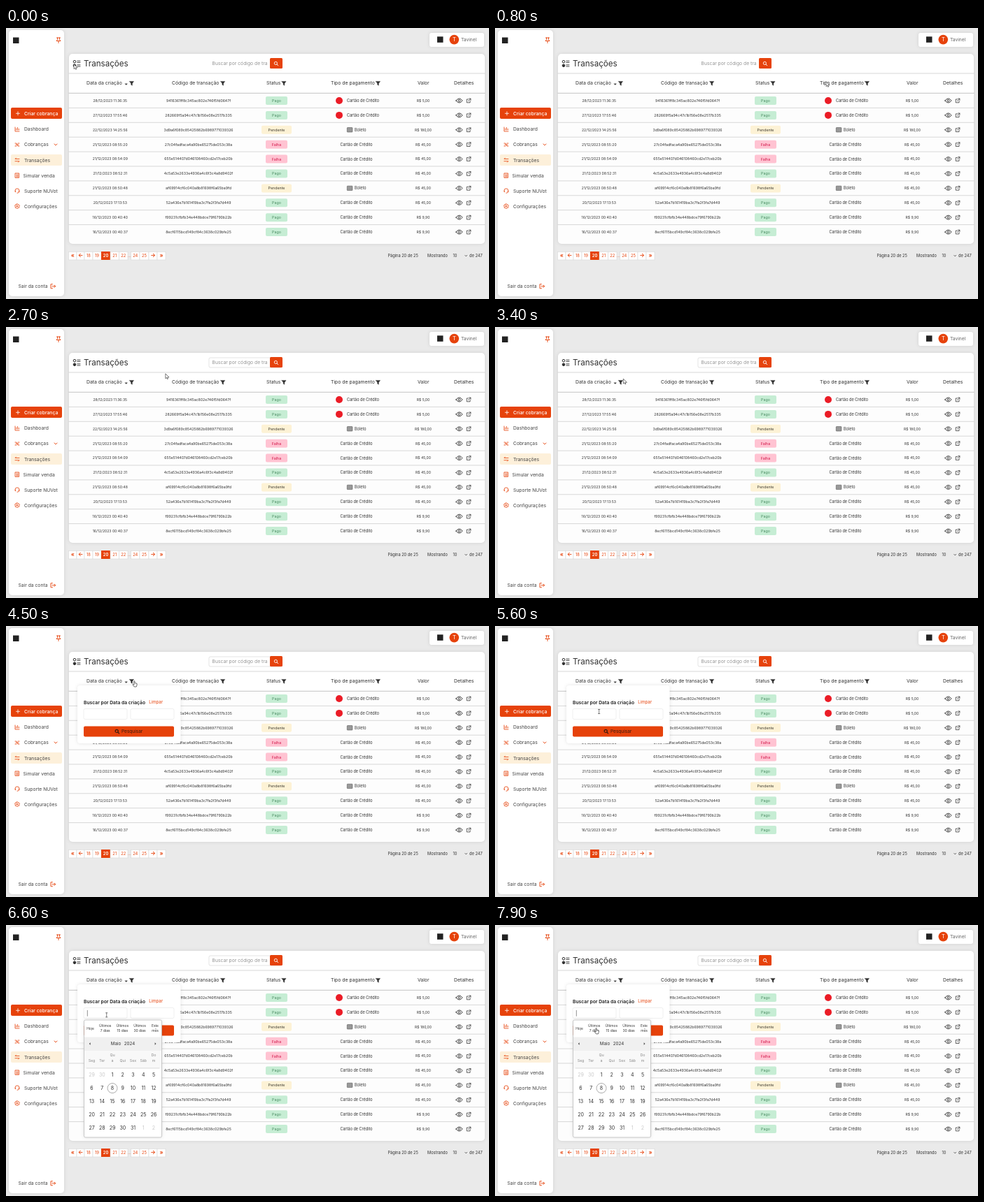
Write an HTML page that moves like this. It is 690 px wide and 388 px high and loops after 8 s.

```html
<!DOCTYPE html>
<html lang="pt-BR">
<head>
<meta charset="utf-8">
<title>Transações</title>
<style>
  html, body { margin: 0; width: 100%; height: 100%; overflow: hidden; background: #eaeaea; }
  svg { display: block; width: 100%; height: 100%; font-family: Inter, "Open Sans", sans-serif; }
  .card { filter: drop-shadow(0 0 2.5px #0000001c); }
</style>
</head>
<body>
<svg id="stage" viewBox="0 0 690 388"></svg>
<script>
const ORANGE = '#e6420b', INK = '#303030';

const rect = (x, y, w, h, fill, r = 0, extra = '') =>
  `<rect x="${x}" y="${y}" width="${w}" height="${h}" rx="${r}" fill="${fill}" ${extra}/>`;
const disc = (x, y, r, fill, extra = '') => `<circle cx="${x}" cy="${y}" r="${r}" fill="${fill}" ${extra}/>`;
const path = (d, stroke, width = 0.8, fill = 'none') =>
  `<path d="${d}" stroke="${stroke}" stroke-width="${width}" fill="${fill}" stroke-linecap="round" stroke-linejoin="round"/>`;
const at = (x, y, content) => `<g transform="translate(${x} ${y})">${content}</g>`;
// y is the vertical middle of the line
const text = (x, y, str, size, fill = INK, anchor = 'start', extra = '') =>
  `<text x="${x}" y="${y + size * 0.36}" font-size="${size}" fill="${fill}" text-anchor="${anchor}" ${extra}>${str}</text>`;
const mid = (x, y, str, size, fill, extra) => text(x, y, str, size, fill, 'middle', extra);
const hline = (x1, x2, y, color, width = 0.6) => path(`M${x1} ${y}H${x2}`, color, width);

const funnel = (x, y) => at(x, y, path('M-3-2.8H3L.8 .2V3L-.8 2V.2Z', INK, 0.5, INK));
const lens = (x, y, color, w = 0.9) => at(x, y, disc(-.6, -.6, 2.1, 'none', `stroke="${color}" stroke-width="${w}"`) + path('M1 1L2.8 2.8', color, w));
const eye = (x, y) => at(x, y, path('M-4.6 0Q0-6.2 4.6 0Q0 6.2-4.6 0Z', INK, 0.9) + disc(0, 0, 1.5, 'none', `stroke="${INK}" stroke-width=".9"`));
const openLink = (x, y) => at(x, y, path('M-.5-2H-2.8V2.8H2V.5M.6-2.9H2.9V-.6M2.8-2.8L-.5 .5', INK, 0.75));

function sidebar() {
  const icons = [
    'M-3-3V3H3M-1.2 1V-1M.6 1V-2.5M2.4 1V-.5',
    'M-3-2H-1L1 2H3M-3 2H-1M1-2H3M-2 0H2',
    'M3-1.6H-3L-1.6-3M-3 1.6H3L1.6 3',
    'M-2.6-3.2H2.6V3.2H-2.6ZM-1.2-1.4H1.2M-1.2 .4H1.2M-1.2 1.8H1.2',
    'M-3 1V-.3A3 3 0 0 1 3-.3V1.4L1 3H0M-2.4 0V1.6M2.4 0V1.6',
    'M-1-3.2H1L1.4-2.2L2.8-2L3.4-.4L2.6 .6L2.8 2L1.2 2.4L0 3.4L-1.2 2.4L-2.8 2L-2.6 .6L-3.4-.4L-2.8-2L-1.4-2.2ZM-1 0A1 1 0 1 0 1 0A1 1 0 1 0-1 0'
  ];
  const labels = ['Dashboard', 'Cobranças', 'Transações', 'Simular venda', 'Suporte NUVot', 'Configurações'];
  const items = labels.map((label, i) => {
    const y = 145 + 22.05 * i;
    return at(16, y, path(icons[i], ORANGE, 0.8)) + text(i === 3 ? 24.5 : 26, y, label, 6.75, '#444');
  }).join('');
  return rect(4, 3, 79, 381, '#fff', 5, 'class="card"')
    + rect(10, 13.5, 8.5, 8.5, '#222')
    + at(75, 17.5, path('M-2.5-3.5H2.5M-1.5-3.5V-.8L-3 1H3L1.5-.8V-3.5M0 1V4', ORANGE, 0.9))
    + rect(7, 114, 73, 16, ORANGE, 2) + path('M14.5 122.3H19.5M17 119.8V124.8', '#fff', 0.8)
    + text(26, 122.3, 'Criar cobrança', 6.8, '#fff', 'start', 'font-weight="500"')
    + rect(7, 181, 73, 16, '#fdf0da', 2) + items
    + path('M69 166L71 168L73 166', ORANGE, 0.9)
    + text(17.5, 369.8, 'Sair da conta', 6.75, '#444')
    + at(67, 369.8, path('M-.5-3H-3V3H-.5M-1 0H3.6L2-1.7M3.6 0L2 1.7', ORANGE, 0.9));
}

function topBar() {
  return rect(605, 7, 78, 20, '#fff', 3, 'class="card"') + rect(616, 12.3, 8.5, 8.5, '#222')
    + disc(640.3, 16.6, 6.8, ORANGE) + mid(640.3, 16.6, 'T', 7.5, '#fff')
    + text(650, 16.8, 'Tavinel', 6.7, '#666');
}

const rows = [
  ['28/12/2023 11:36:35', '9416361ff8c345ac802e746f5fd0647f', 'Pago', 'card', '5,00'],
  ['27/12/2023 17:55:46', '282669f5a94c47c1b156e08e2517b335', 'Pago', 'card', '5,00'],
  ['22/12/2023 14:25:56', '3d9a6f089c85425882b6989771039326', 'Pendente', 'Boleto', '180,00'],
  ['21/12/2023 08:55:20', '27c04fadfaca4a90be65275de053c38a', 'Falha', '', '45,00'],
  ['21/12/2023 08:54:09', '655e514407d046108460cd2e17ceb20b', 'Falha', '', '45,00'],
  ['21/12/2023 08:52:31', '4c5a53e2633e4936a4c6f3c4a8d9402f', 'Pago', '', '45,00'],
  ['21/12/2023 08:50:48', 'af69914cf6c040a8b81698f6a65ba9fd', 'Pendente', 'Boleto', '45,00'],
  ['20/12/2023 17:13:53', '52a436e7b161419ba3c7fa2f3fa7d449', 'Pago', '', '45,00'],
  ['16/12/2023 00:40:40', 'f99231cfbfb34e448bdce79f6790b22b', 'Pago', '', '9,90'],
  ['16/12/2023 00:40:37', '8ecf6115bcd149cf84c3638c029bfe25', 'Pago', '', '9,90']
];
const badges = {
  Pago: [31, '#c6edd4', '#4b8d63'],
  Falha: [31, '#ffc3d2', '#d3174a'],
  Pendente: [43, '#fdf2d5', '#3c3a30']
};

function paymentType(kind, y) {
  if (kind === 'card') return disc(476, y, 5, '#eb1c26') + text(487, y, 'Cartão de Crédito', 5.5);
  if (kind === 'Boleto') return rect(487.3, y - 3.2, 7.6, 6.4, '#999', 0.6, 'stroke="#555" stroke-width=".6"') + text(498, y, kind, 5.5);
  return mid(500.5, y, 'Cartão de Crédito', 5.5);
}

function tablePanel() {
  const headers = [[115, 'Data da criação', 179.5], [237, 'Código de transação', 309.7], [372, 'Status', 397],
    [464, 'Tipo de pagamento', 531.5], [588, 'Valor'], [640, 'Detalhes']];
  const heads = headers.map(([x, label, icon]) =>
    text(x, 79, label, 6.85) + (icon ? funnel(icon, 79.2) : '')).join('');
  const body = rows.map(([date, code, status, kind, value], i) => {
    const y = 104 + 20.9 * i, [w, bg, fg] = badges[status];
    return mid(148.8, y, date, 5.1) + mid(275, y, code, 5.2)
      + rect(386.5 - w / 2, y - 6, w, 12, bg, 2) + mid(386.5, y, status, 5.3, fg)
      + paymentType(kind, y) + mid(596, y, 'R$ ' + value, 5.1)
      + eye(647.5, y) + openLink(661, y)
      + (i < 9 ? hline(90, 684, y + 10.4, '#bebebe') : '');
  }).join('');
  const listIcon = [48.2, 53.8].map((y, i) =>
    disc(98, y, 1.8, i ? INK : 'none', `stroke="${INK}" stroke-width="1"`)
    + path(`M101.8 ${y - 1}H106M101.8 ${y + 1.2}H106`, INK, 0.9)).join('');
  return rect(90, 37, 594, 272, '#fff', 5, 'class="card"') + rect(90, 94, 594, 214, '#fdfdfd', 5)
    + listIcon + text(111, 50.5, 'Transações', 11.6)
    + rect(290, 44, 104, 14, 'none', 2, 'id="searchBorder" stroke="#d8d8d8" stroke-width=".7"')
    + `<clipPath id="searchClip">${rect(290, 44, 83, 14, '#000')}</clipPath>`
    + text(294.5, 51, 'Buscar por código de transação', 6.75, '#949494', 'start', 'clip-path="url(#searchClip)"')
    + rect(377, 43, 18, 15, ORANGE, 1.5) + lens(386, 51, '#fff')
    + hline(90, 684, 65, '#bebebe') + heads + path('M170.2 79.8H173.4L171.8 81.4Z', INK, 0.4, INK)
    + hline(90, 684, 93.3, '#9a9a9a') + body;
}

function pagination() {
  const edges = [89.5, 101, 112, 124, 136, 149, 161.5, 174, 178.5, 191, 204, 216, 228];
  const labels = ['«', '←', '18', '19', '20', '21', '22', '…', '24', '25', '→', '»'];
  const cells = labels.map((label, i) => {
    const x = edges[i], w = edges[i + 1] - x, active = label === '20', symbol = /[«»←→]/.test(label);
    const box = label === '…' ? ''
      : active ? rect(x, 320, w, 12, ORANGE)
      : rect(x, 320.3, w, 11.7, '#fff', 0, 'stroke="#d8d8d8" stroke-width=".6"');
    return box + mid(x + w / 2, symbol ? 325.6 : 326.2, label, symbol ? 8 : 5.8, active ? '#fff' : ORANGE,
      active || symbol ? 'font-weight="600"' : '');
  }).join('');
  return cells + text(545.5, 326, 'Página 20 de 25', 5.65) + text(602, 326, 'Mostrando', 5.7)
    + text(638.5, 326, '10', 5.5) + path('M655.9 325.5L657.2 326.8L658.5 325.5', INK, 0.8) + text(662, 326, 'de 247', 5.7);
}

function filterPopup() {
  const field = x => rect(x, 118.5, 62, 15, '#fff', 2, 'stroke="#e8e8e8" stroke-width=".7"');
  return rect(102, 85, 147.5, 83, '#fff', 4, 'class="card"')
    + text(111, 109.3, 'Buscar por Data da criação', 6.75, '#1c1c1c', 'start', 'font-weight="600"')
    + text(204.3, 109.3, 'Limpar', 6.1, ORANGE) + field(111) + field(178)
    + rect(111, 143.5, 129, 15, ORANGE, 2) + lens(158.8, 151, '#3a1c10', 1.2)
    + text(165, 151, 'Pesquisar', 6.5, '#3a1c10');
}

function calendar() {
  const presets = [[120.5, 'Hoje'], [141.7, 'Últimos', '7 dias'], [166.3, 'Últimos', '15 dias'], [191, 'Últimos', '30 dias'], [213, 'Este', 'mês']];
  const column = i => 122.5 + 14.75 * i;
  const weekdays = ['Seg', 'Ter', 'Qu a', 'Qui', 'Sex', 'Sáb', 'Do m'].map((day, i) => {
    const [top, bottom] = day.split(' ');
    return bottom ? mid(column(i), 186.5, top, 5.3, '#888') + mid(column(i), 194, bottom, 5.3, '#888')
      : mid(column(i), 194, top, 5.3, '#888');
  }).join('');
  let days = '';
  for (let i = 0; i < 35; i++) {
    const n = i - 1, inMonth = n >= 1 && n <= 31;
    const label = n < 1 ? n + 30 : n > 31 ? n - 31 : n;
    days += mid(column(i % 7), 214.5 + 19.1 * Math.floor(i / 7), label, 7, inMonth ? INK : '#c8c8c8');
  }
  return rect(111.5, 136, 111, 168, '#fff', 2, 'class="card" stroke="#b4b4b4" stroke-width=".7"')
    + presets.map(([x, a, b]) => b ? mid(x, 144.3, a, 4.9) + mid(x, 151.3, b, 4.9) : mid(x, 148, a, 4.9)).join('')
    + rect(112, 160.5, 110, 19.5, '#f0f0f0') + rect(112, 180, 110, 25, '#f8f8f8')
    + path('M120.2 168.9L119 170L120.2 171.1ZM213 168.9L214.2 170L213 171.1Z', INK, 0.4, INK)
    + mid(157, 170, 'Maio', 6.2) + mid(176.5, 170, '2024', 6.2) + weekdays
    + hline(115, 219, 205, '#c4c4c4')
    + disc(column(2), 233.6, 7, 'none', 'stroke="#888" stroke-width=".7"') + days;
}

const pointers = {
  arrow: path('M0 0V6.6L1.6 5.2L2.6 7.4L3.6 7L2.7 4.8H4.7Z', '#222', 0.6, '#fff'),
  hand: path('M0 .4Q.6-.6 1.2 .4V3L4.2 3.7V6L3.4 8.4H.4L-1.9 5.2Q-1.6 4.2 0 5.3Z', '#222', 0.65, '#fff'),
  beam: path('M-1.2-3H1.2M0-3V3M-1.2 3H1.2', '#333', 0.6)
};

const stage = document.getElementById('stage');
const group = (id, content) => `<g id="${id}">${content}</g>`;
stage.innerHTML = rect(0, 0, 690, 388, '#eaeaea') + sidebar() + topBar() + tablePanel() + pagination()
  + group('popup', filterPopup()) + group('caret', path('M116.3 122.3V130.3', '#444', 0.6))
  + group('calendar', calendar())
  + Object.entries(pointers).map(([id, shape]) => group(id, shape)).join('');
const el = id => document.getElementById(id);
const show = (id, on) => { el(id).style.display = on ? '' : 'none'; };

// time, x, y of the pointer
const track = [
  [0, 97, 52], [600, 200, 118], [700, 200, 118], [800, 473, 77], [1200, 473, 77], [1700, 306, 50],
  [2000, 344.5, 25], [2100, 344.5, 25], [3000, 187, 82], [3100, 187, 82], [3400, 183.3, 74.5],
  [3900, 182.8, 78.6], [4900, 182.8, 78.6], [5800, 143.7, 128.8], [7400, 143.7, 128.8],
  [7900, 144, 147.5], [8000, 144, 147.5]
];
const lerp = (a, b, k) => a + (b - a) * k;
const clamp = k => Math.max(0, Math.min(1, k));

function pointerAt(t) {
  const i = track.findIndex(([end]) => end > t);
  const [t0, x0, y0] = track[i - 1], [t1, x1, y1] = track[i];
  const k = (t - t0) / (t1 - t0), eased = k * k * (3 - 2 * k);
  return [lerp(x0, x1, eased), lerp(y0, y1, eased)];
}

function draw(now) {
  const t = Math.floor((now % 8000) / 100) * 100;
  const kind = t < 3700 ? 'arrow' : t < 5300 ? 'hand' : t < 5500 ? 'arrow' : t < 7700 ? 'beam' : 'hand';
  const [x, y] = pointerAt(t);
  for (const id in pointers) show(id, id === kind);
  el(kind).setAttribute('transform', `translate(${x} ${y})`);

  show('searchBorder', t >= 2200);
  show('popup', t >= 4500);
  show('caret', (t >= 6400 && t < 6900) || t >= 7500);
  show('calendar', t >= 6400);
  const k = clamp((t - 6400) / 200), grow = 1 - (1 - k) ** 2;
  const scale = lerp(0.66, 1, grow);
  el('calendar').setAttribute('transform', `translate(111 136) scale(${scale}) translate(-111 -136)`);
  el('calendar').setAttribute('opacity', lerp(0.15, 1, grow));
  requestAnimationFrame(draw);
}
draw(0);
</script>
</body>
</html>
```
